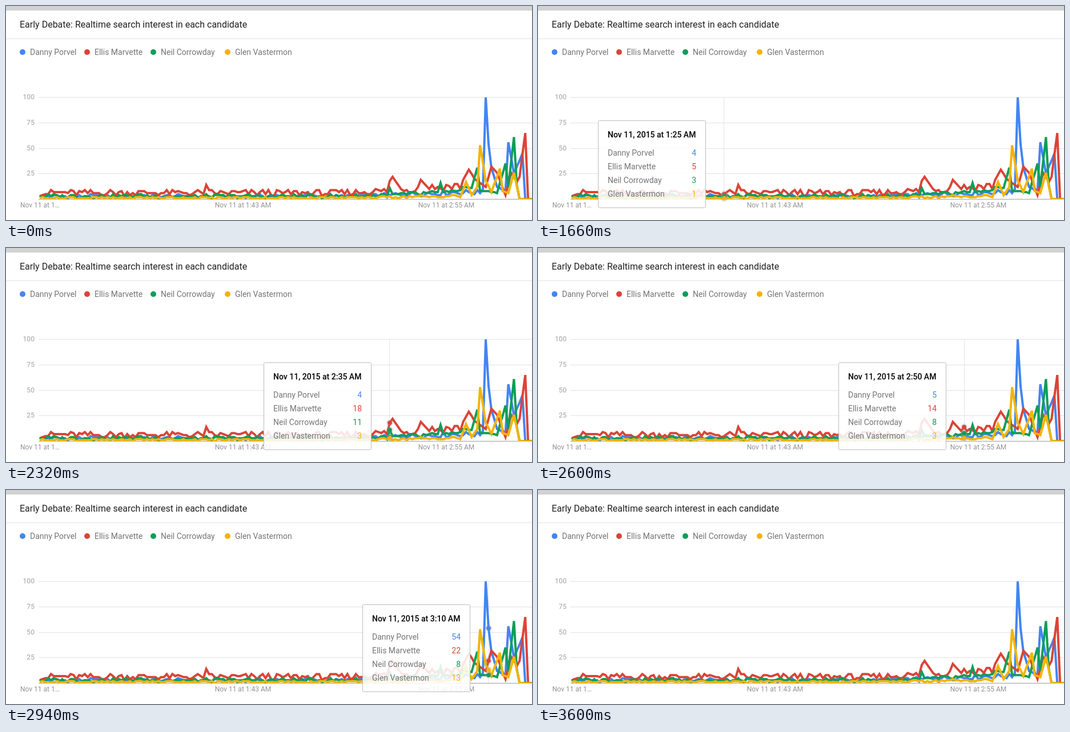
An HTML page with a canvas for the animation above (4.16 s loop, 921 px wide and 376 px high).

```html
<!DOCTYPE html>
<html lang="en">
<head>
<meta charset="utf-8">
<title>Realtime search interest</title>
<style>
  html, body { margin: 0; width: 100%; height: 100%; overflow: hidden; background: #fff; }
  canvas { display: block; }
</style>
</head>
<body>
<canvas id="stage" width="921" height="376"></canvas>
<script>
const ctx = document.getElementById('stage').getContext('2d');
const LOOP = 4160;
const MINUTES = 175;
const AXIS_Y = 339.5;

const xAt = i => 59 + i * 4.943;
const yAt = v => AXIS_Y - v * 1.79;
const lerp = (a, b, p) => a + (b - a) * p;

// Noise around a rising base, pinned at a few [minute, value] key points.
const series = [
  { name: 'Danny Porvel', color: '#4285f4', legendX: 29, base: 3, spread: 1.6, rise: 4,
    keys: [[35, 3], [54, 4], [124, 4], [157, 10], [158, 100], [159, 54], [160, 31], [162, 12],
      [165, 8], [166, 56], [168, 25], [171, 45], [172, 0]] },
  { name: 'Ellis Marvette', color: '#db4437', legendX: 142, base: 6.3, spread: 3, rise: 7,
    keys: [[35, 8], [54, 5], [59, 14], [124, 18], [125, 22], [128, 10], [135, 19], [138, 10],
      [150, 19], [152, 29], [154, 20], [158, 12], [160, 32], [162, 26], [165, 4], [167, 26],
      [169, 17], [170, 22], [172, 65], [173, 0]] },
  { name: 'Neil Corrowday', color: '#0f9d58', legendX: 258, base: 3, spread: 2, rise: 3.5,
    keys: [[35, 5], [54, 3], [124, 11], [142, 16], [150, 12], [153, 11], [155, 31], [156, 8],
      [158, 8], [162, 6], [165, 35], [166, 12], [168, 61], [169, 14], [170, 0]] },
  { name: 'Glen Vastermon', color: '#f4b400', legendX: 388, base: 1.4, spread: 1, rise: 1.8,
    keys: [[35, 2], [54, 1], [124, 3], [150, 9], [151, 17], [153, 4], [155, 12], [156, 53],
      [158, 18], [160, 7], [163, 30], [164, 8], [166, 6], [168, 26], [170, 0]] }
];

function noise(i, seed) {
  const n = Math.sin(i * 12.9898 + seed * 78.233) * 43758.5453;
  return (n - Math.floor(n)) * 2 - 1;
}

// Key points at most four minutes apart are joined by straight lines.
function valueAt(s, i, seed) {
  const next = s.keys.findIndex(([minute]) => minute >= i);
  if (next < 0) return 0;
  const [end, high] = s.keys[next];
  if (end === i) return high;
  const [start, low] = s.keys[next - 1] || [-Infinity, 0];
  if (end - start <= 4) return Math.round(lerp(low, high, (i - start) / (end - start)));
  const late = Math.min(1, Math.max(0, (i - 110) / 40));
  const v = s.base + s.rise * late + noise(i, seed) * s.spread * (1 + late * 0.6);
  return Math.max(0, Math.round(v));
}

series.forEach((s, k) => {
  s.values = Array.from({ length: MINUTES }, (_, i) => valueAt(s, i, k + 1));
});

// The pointer glides between minutes and rests at the end of each sweep.
const sweeps = [
  { start: 1360, end: 1740, from: 35, to: 71, ease: p => p ** 2.65 },
  { start: 2100, end: 2400, from: 98, to: 139, ease: p => p ** 1.45 },
  { start: 2600, end: 3080, from: 139, to: 161, ease: p => 1 - (1 - p) ** 2.41 },
  { start: 3180, end: 3200, from: 161, to: 163, ease: p => p },
  { start: 3500, end: 3600, from: 157, to: 157, ease: p => p }
];

function hoveredAt(t) {
  const visible = (t >= 1360 && t < 1760) || (t >= 2100 && t < 3600);
  if (!visible) return null;
  const { start, end, from, to, ease } = sweeps.filter(s => t >= s.start).pop();
  const sampled = Math.floor(t / 20) * 20;
  const p = Math.min(1, (sampled - start) / (end - start));
  return Math.floor(lerp(from, to, ease(p)));
}

function text(str, x, y, size, color, align = 'left', weight = 400) {
  ctx.font = `${weight} ${size}px Roboto, sans-serif`;
  ctx.fillStyle = color;
  ctx.textAlign = align;
  ctx.fillText(str, x, y);
}

function dot(x, y, r, color) {
  ctx.fillStyle = color;
  ctx.beginPath();
  ctx.arc(x, y, r, 0, Math.PI * 2);
  ctx.fill();
}

function drawHeader() {
  ctx.fillStyle = '#fff';
  ctx.fillRect(0, 0, 921, 376);
  ctx.fillStyle = '#d2d2d2';
  ctx.fillRect(0, 0, 921, 8);
  ctx.fillStyle = '#e2e2e2';
  ctx.fillRect(0, 57, 921, 1);
  text('Early Debate: Realtime search interest in each candidate', 24, 38, 16, '#212121');
  for (const s of series) {
    dot(s.legendX, 81, 5, s.color);
    text(s.name, s.legendX + 13, 86, 14, '#757575');
  }
}

function drawAxes() {
  for (const v of [25, 50, 75, 100]) {
    const y = Math.floor(yAt(v));
    ctx.fillStyle = '#e2e2e2';
    ctx.fillRect(57, y, 864, 1);
    text(v, 50, y + 4, 12, '#b5b5b5', 'right', 500);
  }
  ctx.fillStyle = '#9e9e9e';
  ctx.fillRect(57, 339, 864, 1);
  text('Nov 11 at 1…', 25, 354, 12, '#929292');
  text('Nov 11 at 1:43 AM', 415, 354, 12, '#929292', 'center');
  text('Nov 11 at 2:55 AM', 771, 354, 12, '#929292', 'center');
}

function drawLines() {
  ctx.save();
  ctx.beginPath();
  ctx.rect(57, 150, 864, 190);
  ctx.clip();
  ctx.lineWidth = 4;
  ctx.miterLimit = 4;
  for (const s of series) {
    ctx.strokeStyle = s.color;
    ctx.beginPath();
    s.values.forEach((v, i) => ctx.lineTo(xAt(i), yAt(v)));
    ctx.lineTo(925, AXIS_Y);
    ctx.stroke();
  }
  ctx.restore();
}

function clock(i) {
  const total = 31 + i;
  return `${Math.floor(total / 60) || 12}:${String(total % 60).padStart(2, '0')} AM`;
}

function drawCrosshair(minute) {
  ctx.fillStyle = '#e4e4e4';
  ctx.fillRect(Math.round(xAt(minute) - 0.5), 160, 1, 179);
}

function drawMarkers(minute) {
  const x = xAt(minute);
  for (const s of series) {
    const y = yAt(s.values[minute]);
    dot(x, y, 6, 'rgba(150, 150, 150, 0.3)');
    dot(x, y, 3.8, s.color);
  }
}

function drawTooltip(minute) {
  const x = Math.max(29.5, Math.round(xAt(minute) - 220.5) + 0.5);
  ctx.beginPath();
  ctx.roundRect(x, 201.5, 188, 153, 2);
  ctx.fillStyle = 'rgba(255, 255, 255, 0.87)';
  ctx.fill();
  ctx.strokeStyle = '#bdbdbd';
  ctx.lineWidth = 1;
  ctx.stroke();
  text(`Nov 11, 2015 at ${clock(minute)}`, x + 16.5, 231, 14, '#000', 'left', 500);
  series.forEach((s, row) => {
    const y = 263 + row * 24;
    text(s.name, x + 16.5, y, 14, '#757575');
    text(s.values[minute], x + 171.5, y, 14, s.color, 'right');
  });
}

function draw(t) {
  const minute = hoveredAt(t);
  const hovering = minute !== null;
  drawHeader();
  drawAxes();
  if (hovering) drawCrosshair(minute);
  drawLines();
  if (hovering) {
    drawMarkers(minute);
    drawTooltip(minute);
  }
}

const began = performance.now();
function tick() {
  draw((performance.now() - began) % LOOP);
  requestAnimationFrame(tick);
}
tick();
</script>
</body>
</html>
```
